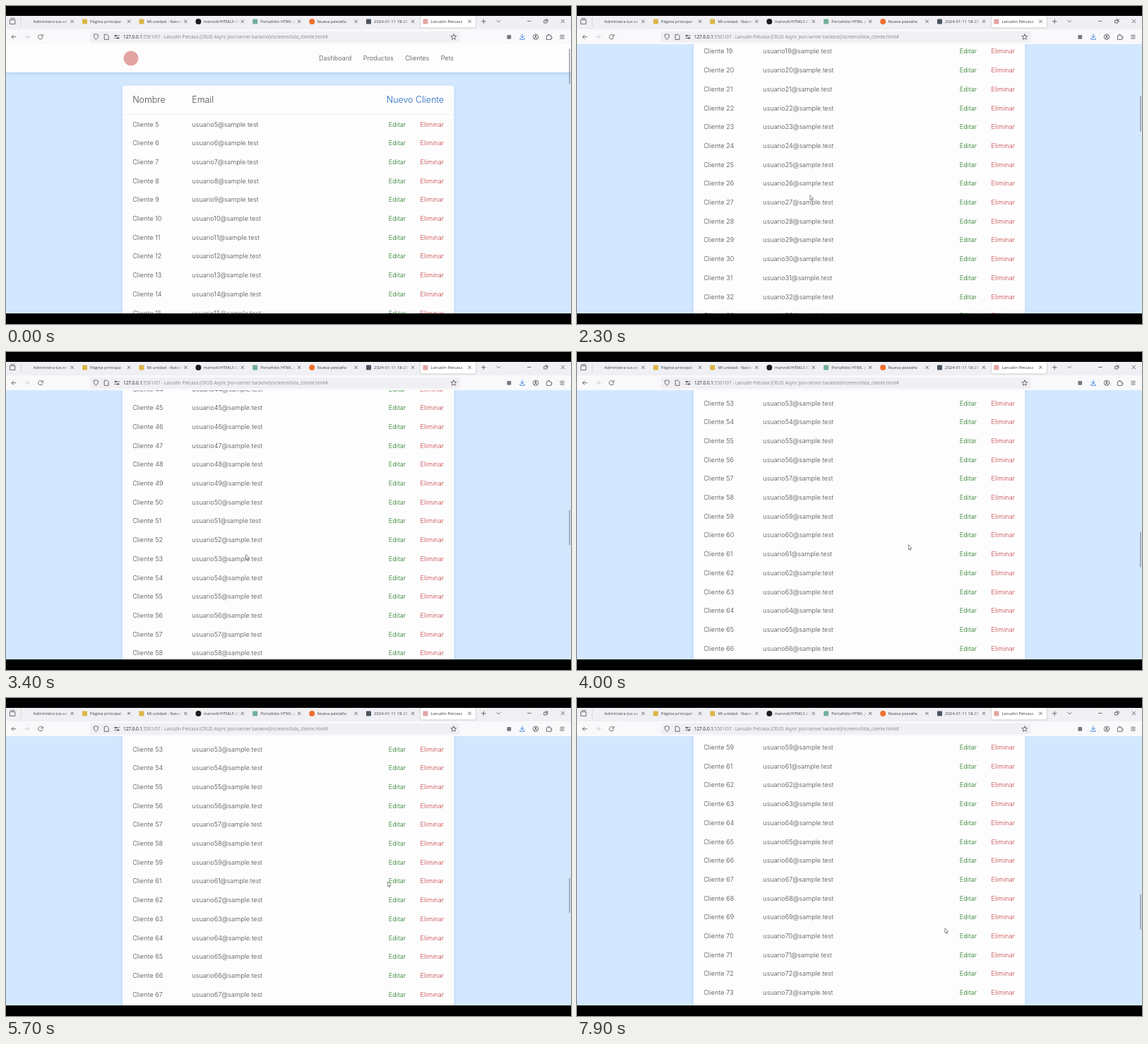
Write an HTML page with a canvas that moves like this. It is 800 by 450 pixels and loops after 8000 ms.

```html
<!DOCTYPE html>
<html lang="es">
<head>
<meta charset="utf-8">
<title>Lista de clientes</title>
<style>
html, body { margin: 0; width: 100%; height: 100%; overflow: hidden; background: #000; }
canvas { display: block; width: 800px; height: 450px; }
</style>
</head>
<body>
<canvas id="stage"></canvas>
<script>
const W = 800, H = 450, LOOP = 8000;
const canvas = document.getElementById('stage');
const ratio = window.devicePixelRatio || 1;
canvas.width = W * ratio;
canvas.height = H * ratio;
const ctx = canvas.getContext('2d');

const UI = '"Open Sans", "Noto Sans", sans-serif';
const PAGE = 'Inter, Roboto, sans-serif';
const INK = '#4a4a4f', ICON = '#4b4b51', WHITE = '#fefdfe';
const TOP = 54, BOTTOM = 435, RIGHT = 634, EDGE = 620;
const ROW = 26.7, FIRST = 5, LAST = 102, REMOVED = 60;
const LOAD = { start: 4950, end: 5300, done: 5500 };
const STOP = 1376.6;

const TABS = [
  { title: 'Administra tus ex' },
  { title: 'Página principal -', color: '#dcb545' },
  { title: 'Mi unidad - Navor', color: '#dcb545' },
  { title: 'marvolt/HTML5-CS', color: '#1c1d20', round: true },
  { title: 'Portafolio HTML y', color: '#6fb097' },
  { title: 'Nueva pestaña', color: '#f0702c', round: true },
  { title: '2024-01-11 18-25', color: '#4a545f' },
  { title: 'Lanudin Petcasa', color: '#e3a5a1' }
];

const POINTER = [
  { t: 700, x: 345, y: 440 },
  { t: 1300, x: 329, y: 207 },
  { t: 2300, x: 330, y: 268 },
  { t: 3400, x: 340, y: 287 },
  { t: 4600, x: 598, y: 259 },
  { t: 5500, x: 598, y: 259 },
  { t: 6300, x: 232, y: 266 },
  { t: 6900, x: 252, y: 257 },
  { t: 7900, x: 521, y: 326 }
];

// distance scrolled when speed ramps up over one second, then holds
function glide(t, speed = 0.6177, ramp = 1006) {
  if (t <= 0) return 0;
  return t < ramp ? speed * t * t / (2 * ramp) : speed * (t - ramp / 2);
}

function scrollAt(t) {
  return Math.min(STOP, glide(t - 1026)) + glide(t - 7173);
}

function pointerAt(t) {
  const i = POINTER.findIndex(p => p.t > t);
  if (i < 0) return POINTER[POINTER.length - 1];
  if (i === 0) return null;
  const a = POINTER[i - 1], b = POINTER[i];
  const u = (t - a.t) / (b.t - a.t), e = u * u * (3 - 2 * u);
  return { x: a.x + (b.x - a.x) * e, y: a.y + (b.y - a.y) * e };
}

function rect(x, y, w, h, fill) {
  ctx.fillStyle = fill;
  ctx.fillRect(x, y, w, h);
}

function box(x, y, w, h, r, fill) {
  ctx.fillStyle = fill;
  ctx.beginPath();
  ctx.roundRect(x, y, w, h, r);
  ctx.fill();
}

function raised(color, blur, dy, ...args) {
  ctx.save();
  ctx.shadowColor = color;
  ctx.shadowBlur = blur * ratio;
  ctx.shadowOffsetY = dy * ratio;
  box(...args);
  ctx.restore();
}

function clipped(x, y, w, h, draw) {
  ctx.save();
  ctx.beginPath();
  ctx.rect(x, y, w, h);
  ctx.clip();
  draw();
  ctx.restore();
}

function dot(x, y, r, fill) {
  ctx.fillStyle = fill;
  ctx.beginPath();
  ctx.arc(x, y, r, 0, 7);
  ctx.fill();
}

function ring(x, y, r, from = 0, to = Math.PI * 2) {
  ctx.beginPath();
  ctx.arc(x, y, r, from, to);
  ctx.stroke();
}

function line(...p) {
  ctx.beginPath();
  for (let i = 0; i < p.length; i += 2) ctx.lineTo(p[i], p[i + 1]);
  ctx.stroke();
}

// open angle of half-size r around a point, turned by quarter turns
function chevron(x, y, r, turns) {
  ctx.save();
  ctx.translate(x, y);
  ctx.rotate(turns * Math.PI / 2);
  line(-r, -r, 0, 0, r, -r);
  ctx.restore();
}

function cross(x, y, r) {
  line(x - r, y - r, x + r, y + r);
  line(x + r, y - r, x - r, y + r);
}

function pen(color, width = 0.8) {
  ctx.strokeStyle = color;
  ctx.lineWidth = width;
  ctx.lineCap = ctx.lineJoin = 'round';
}

function text(s, x, y, font, fill, align = 'left') {
  ctx.font = font;
  ctx.fillStyle = fill;
  ctx.textAlign = align;
  ctx.fillText(s, x, y);
  return ctx.measureText(s).width;
}

const body = (s, x, y, fill = INK, align) => text(s, x, y, '300 9.15px ' + PAGE, fill, align);
const head = (s, x, fill = INK, align) => text(s, x, 133.6, '300 12.4px ' + PAGE, fill, align);

function tabBar(loading) {
  rect(0, 14, W, 19, '#f0f0f4');
  pen(ICON);
  ctx.strokeRect(5.8, 19.5, 7, 6);
  line(6.6, 17.6, 12, 17.6);
  rect(21, 16, 0.8, 13, '#cfcfd6');
  raised('rgba(0,0,0,.3)', 2.5, 0, 587, 14, 78, 16.5, 2, '#fff');

  TABS.forEach(({ title, color, round }, i) => {
    const x = 38.6 + 80.4 * i;
    if (i === 7 && loading) dot(594, 22, 1.2, ICON);
    else if (round) dot(x - 7.4, 22, 4, color);
    else if (color) box(x - 11, 18.5, 7, 7, 1, color);
    const fade = ctx.createLinearGradient(x + 40, 0, x + 51, 0);
    fade.addColorStop(0, '#3c3c43');
    fade.addColorStop(1, 'rgba(60,60,67,.1)');
    clipped(x, 14, 51, 18, () => text(title, x, 22, '5.95px ' + UI, fade));
    cross(x + 55, 21.8, 1.9);
  });

  line(673.2, 21.8, 679.2, 21.8);
  line(676.2, 18.8, 676.2, 24.8);
  chevron(697.4, 23, 2.5, 0);
  line(738.4, 21.5, 743.2, 21.5);
  ctx.strokeRect(762, 20.4, 3.6, 3.6);
  line(763.4, 19, 767, 19, 767, 22.6);
  cross(788.4, 21.5, 2.3);
}

function backArrow(x, dir, color) {
  pen(color);
  line(x - 3 * dir, 43.7, x + 3 * dir, 43.7);
  chevron(x - 3 * dir, 43.7, 2.7, dir);
}

function reloadIcon(mirror) {
  ctx.save();
  ctx.translate(49, 43.7);
  if (mirror) ctx.scale(-1, 1);
  pen(ICON);
  ring(0, 0, 3.2, 0.3, 5.4);
  line(3.3, -3.4, 3.3, -1, 0.9, -1);
  ctx.restore();
}

function star(x, y, r) {
  ctx.beginPath();
  for (let i = 0; i < 10; i++) {
    const d = i % 2 ? r * 0.46 : r, a = i * Math.PI / 5 - Math.PI / 2;
    ctx.lineTo(x + d * Math.cos(a), y + d * Math.sin(a));
  }
  ctx.closePath();
  ctx.stroke();
}

function toolbar(loading) {
  rect(0, 33, W, TOP - 33, '#f9f9fb');
  backArrow(11, 1, ICON);
  backArrow(30, -1, '#c3c3c9');
  reloadIcon(loading);
  box(119, 36, 523.5, 15.4, 2, '#f0f0f4');

  pen(ICON);
  ctx.stroke(new Path2D('M127.4 39.8l3.2 1.2q0 4.7-3.2 6.6q-3.2-1.9-3.2-6.6z'));
  ctx.stroke(new Path2D('M139.6 40.2h3.6l2 2v5.2h-5.6z'));
  for (const [y, x] of [[42, 155.4], [45.4, 158.6]]) {
    line(153.6, y, 160.4, y);
    dot(x, y, 1.2, ICON);
  }

  const font = '6.35px ' + UI;
  const host = text('127.0.0.1', 166, 44, font, '#222226');
  text(':5501/07 - Lanudin Petcasa (CRUD Async json-server backend)/screens/lista_cliente.html#',
    166 + host, 44, font, '#85858b');

  star(633.8, 43.9, 4.1);
  box(709.4, 40.9, 5.8, 5.8, 1, '#77777d');
  pen('#1a6fe0');
  line(731, 39.8, 731, 44.8);
  chevron(731, 45, 2.4, 0);
  line(727.8, 45.6, 727.8, 47.2, 734.2, 47.2, 734.2, 45.6);
  pen(ICON);
  ring(750, 43.7, 3.7);
  dot(750, 42.6, 1.2, ICON);
  ring(750, 46.2, 1.8, Math.PI, 0);
  ctx.stroke(new Path2D('M765.8 42h1.6v-1.6h2v1.6h2.4v2h1.2v1.6h-1.2v1.8h-6z'));
  for (let i = 0; i < 3; i++) line(784.6, 41.4 + i * 2.3, 790.2, 41.4 + i * 2.3);
}

function listPage(scroll, empty, removed) {
  const shade = 'rgba(100,160,225,.3)';
  const height = empty ? 40.7 : 2680;
  clipped(0, TOP, W, BOTTOM - TOP, () => {
    rect(0, TOP, W, BOTTOM - TOP, '#d3e8fe');
    ctx.translate(0, -scroll);

    raised(shade, 5, 2, 0, 40, W, 54, 4, WHITE);
    dot(177, 74, 10.5, '#e3a5a1');
    let x = RIGHT;
    for (const s of ['Pets', 'Clientes', 'Productos', 'Dashboard']) {
      x -= body(s, x, 74.4, INK, 'right') + 16.4;
    }

    raised(shade, 5, 2, 165, 112.8, RIGHT + 0.3 - 165, height, 4, WHITE);
    head('Nombre', 179.2);
    head('Email', 263.3);
    head('Nuevo Cliente', EDGE, '#2468be', 'right');
    if (!empty) {
      rect(165, 153.2, RIGHT - 165, 0.7, '#e9ebef');
      rows(scroll, removed);
    }
  });
  if (!empty) box(797.3, 60.5 + scroll / 7.1, 1.3, 50, 0.6, '#8d8d92');
}

function rows(scroll, removed) {
  let y = 167.8;
  for (let n = FIRST; n <= LAST; n++) {
    if (removed && n === REMOVED) continue;
    if (y > scroll + 40 && y < scroll + H) {
      body('Cliente ' + n, 179.2, y);
      body('usuario' + n + '@sample.test', 263.3, y);
      body('Editar', 566, y, '#1f781f', 'right');
      body('Eliminar', EDGE, y, '#c23f3f', 'right');
    }
    y += ROW;
  }
}

const ARROW = new Path2D('M0 0v6.6l1.5-1.3l1 2.4l1-.5l-1-2.3h2z');
const HAND = new Path2D('M0 0h1.1l.2 3.3l2.9.7l.3 1.2l-.7 3.8h-3.8l-2.3-3.2l.6-.7l1.5 1.1z');

function pointer(t) {
  const p = pointerAt(t);
  if (!p) return;
  const onLink = p.x > 584 && p.x < EDGE;
  clipped(0, 14, W, BOTTOM - 14, () => {
    ctx.translate(p.x, p.y);
    const shape = onLink ? HAND : ARROW;
    ctx.fillStyle = '#fff';
    ctx.fill(shape);
    pen('#444', 0.6);
    ctx.stroke(shape);
  });
}

function render(t) {
  const empty = t >= LOAD.start && t < LOAD.end;
  const loading = t >= LOAD.start && t < LOAD.done;
  ctx.setTransform(ratio, 0, 0, ratio, 0, 0);
  ctx.textBaseline = 'middle';
  rect(0, 0, W, H, '#000');
  listPage(empty ? 0 : scrollAt(t), empty, t >= LOAD.start);
  tabBar(loading);
  toolbar(empty);
  if (t >= 4650 && t < LOAD.end) {
    box(0, 425.3, 136, BOTTOM - 425.3, [0, 2, 0, 0], '#f5f5f8');
    text('127.0.0.1', 1, 431, '5.6px ' + UI, '#55555b');
  }
  pointer(t);
}

const begin = performance.now();
function tick() {
  render((performance.now() - begin) % LOOP);
  requestAnimationFrame(tick);
}
tick();
</script>
</body>
</html>
```
